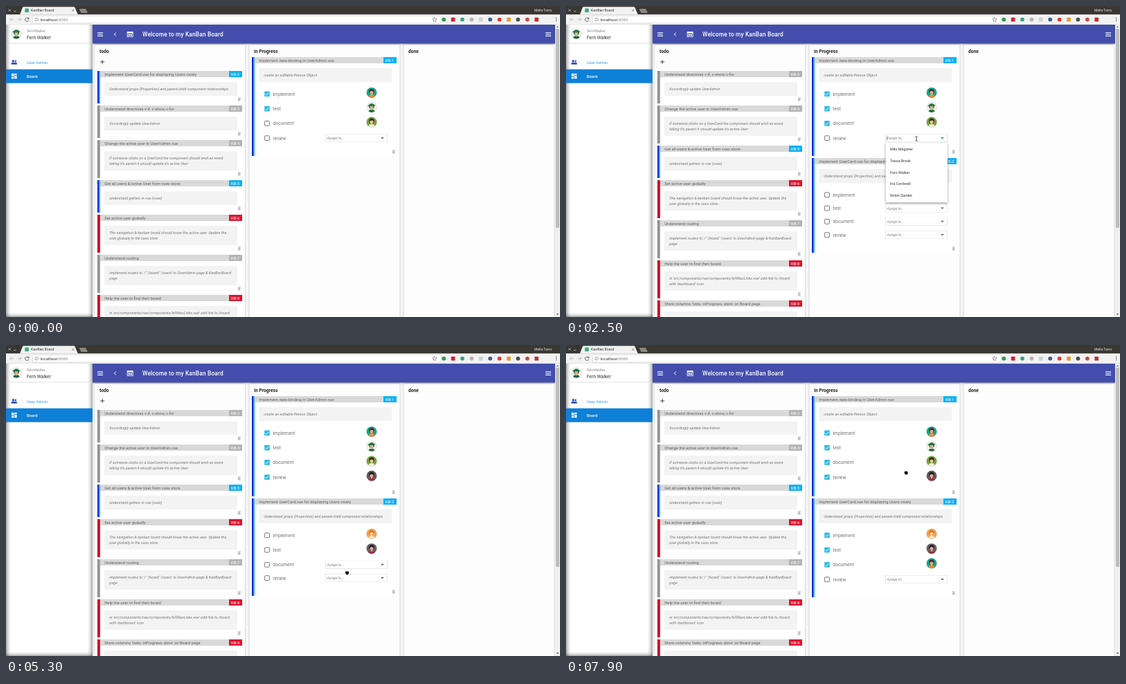
These frames come from a looping animation (800 by 450 pixels, 8000 ms). An HTML page:

```html
<!DOCTYPE html>
<html lang="en">
<head>
<meta charset="utf-8">
<title>KanBan Board</title>
<style>
  html, body { margin: 0; width: 100%; height: 100%; overflow: hidden; background: #fff; }
  svg { display: block; width: 100vw; height: 100vh; }
  text { font-family: Roboto, "Open Sans", sans-serif; white-space: pre; }
  .i { font-style: italic; }
  .m { font-weight: 500; }
  .b { font-weight: 700; }
  .end { text-anchor: end; }
  .wide { letter-spacing: .17px; }
  .card { filter: drop-shadow(0 .6px .7px rgba(0,0,0,.45)); }
  .field { filter: drop-shadow(0 .7px .5px rgba(0,0,0,.4)); }
  .menu { filter: drop-shadow(0 1px 1.6px rgba(0,0,0,.45)); }
  .panel { filter: drop-shadow(.6px 0 1.4px rgba(0,0,0,.28)); }
  .bar { filter: drop-shadow(0 1px 1.2px rgba(0,0,0,.35)); }
</style>
</head>
<body>
<svg viewBox="0 0 800 450" preserveAspectRatio="none">
  <defs>
    <clipPath id="round"><circle r="7.4"/></clipPath>
    <linearGradient id="edge">
      <stop offset="0" stop-color="#000" stop-opacity=".36"/>
      <stop offset=".45" stop-color="#000" stop-opacity=".13"/>
      <stop offset="1" stop-color="#000" stop-opacity="0"/>
    </linearGradient>
  </defs>
  <g id="page"></g>
  <g id="live"></g>
  <g id="chrome"></g>
</svg>
<script>
const LOOP = 8000, STEP = 100, NEVER = 1e9;
const $ = id => document.getElementById(id);

// Drawing helpers; text is placed by its vertical middle.
const text = (x, y, s, size, fill, cls = '') =>
  `<text x="${x}" y="${(y + size * .35).toFixed(2)}" font-size="${size}" fill="${fill}" class="${cls}">${s}</text>`;
const rect = (x, y, w, h, fill, more = '') =>
  `<rect x="${x}" y="${y}" width="${w}" height="${h}" fill="${fill}" ${more}/>`;
const dot = (x, y, r, fill, more = '') => `<circle cx="${x}" cy="${y}" r="${r}" fill="${fill}" ${more}/>`;
const path = (d, fill, more = '') => `<path d="${d}" fill="${fill}" ${more}/>`;
const line = (d, color, w = 1) => path(d, 'none', `stroke="${color}" stroke-width="${w}"`);
const at = (x, y, s) => `<g transform="translate(${x} ${y})">${s}</g>`;

const TONES = {
  blue: { badge: '#12b0f2', left: '#0a28e6', right: '#1fb4fb' },
  gray: { badge: '#b4b4b4', left: '#8c8c8c', right: '#a2a2a2' },
  red: { badge: '#dc1530', left: '#c50f28', right: '#d3182f' }
};

const TODO = [
  { id: 3, tone: 'gray', title: 'Understand directives v-if, v-show, v-for', lines: ['Accordingly update UserAdmin'] },
  { id: 4, tone: 'gray', title: 'Change the active user in UserAdmin.vue',
    lines: ['if someone clicks on a UserCard the component should emit an event', "telling it's parent it should update it's active User"] },
  { id: 5, tone: 'blue', title: 'Get all users &amp; active User from vuex store', lines: ['understand getters in vue (vuex)'] },
  { id: 6, tone: 'red', title: 'Set active user globally',
    lines: ['The navigation &amp; kanban board should know the active user. Update the', 'user globally in the vuex store'] },
  { id: 7, tone: 'gray', title: 'Understand routing',
    lines: ["implement routes to '/' '/board' '/users' to UserAdmin page &amp; KanBanBoard", 'page'] },
  { id: 8, tone: 'red', title: 'Help the user to find their board',
    lines: ["in 'src/components/nav/components/leftNavLinks.vue' add link to /board", "with 'dashboard' icon"] },
  { id: 9, tone: 'red', title: "Show columns 'todo, inProgress, done' on Board page", lines: [''] }
];

// Each step: owner, when its menu opens, when the owner is set, when it is ticked.
const step = (name, who, open, set, tick) => ({ name, who, open, set, tick });
const FIRST = {
  id: 1, tone: 'blue', title: 'Implement data-binding in UserAdmin.vue', lines: ['create an editable Person Object'],
  steps: [
    step('implement', 'teal', NEVER, 0, 0),
    step('test', 'hunter', NEVER, 0, 0),
    step('document', 'green', NEVER, 0, 1700),
    step('review', 'grey', 2300, 2900, 3400)
  ]
};
const MOVED = {
  id: 2, tone: 'blue', title: 'Implement UserCard.vue for displaying Users nicely',
  lines: ['Understand props (Properties) and parent-child component relationships'],
  steps: [
    step('implement', 'orange', 3900, 4300, 5900),
    step('test', 'grey', 4800, 5100, 6500),
    step('document', 'teal', 5400, 5700, 7000),
    step('review', '', NEVER, NEVER, NEVER)
  ]
};
const PEOPLE = ['Milo Magister', 'Tessa Brook', 'Fern Walker', 'Ina Cordwell', 'Robin Sander'];
const GRAB = 200, CROSS = 600, DROP = 1300;

// background, hair, skin, clothes
const FACES = {
  teal: ['#18a98c', '#33343a', '#e9a877', '#f08a3c'],
  hunter: ['#f3f6f0', '#1b4a2c', '#d9b48c', '#1f6b3c'],
  green: ['#77a83c', '#3a2b25', '#f0c39a', '#eef0ea'],
  grey: ['#67606a', '#241f22', '#e3a98d', '#a92c3b'],
  orange: ['#f6a548', '#d9762b', '#f8d0a2', '#f3ead8']
};

function avatar(x, y, who) {
  const [back, hair, skin, shirt] = FACES[who];
  const hat = who === 'hunter' ? path('M-6 -2.2Q0 -8 5.8 -2.6Q0 -1 -6 -2.2Z', '#1d7d42') : '';
  return at(x, y, dot(0, 0, 7.4, back) +
    `<g clip-path="url(#round)">${dot(0, 8, 5.2, shirt)}${dot(0, -1.5, 3.9, hair)}` +
    `${rect(-1.1, 1, 2.2, 3, skin)}${dot(0, -.3, 2.6, skin)}` +
    `${path('M-2.8 -1Q0 -4 2.8 -1L2.6 -2.8Q0 -5 -2.6 -2.8Z', hair)}${hat}</g>` +
    dot(0, 0, 7.2, 'none', 'stroke="#0003" stroke-width=".5"'));
}

const arrow = (x, y, fill) => path(`M${x - 2.4} ${y - 1.2}h4.8l-2.4 2.5z`, fill);

function field(y, active) {
  return rect(461.5, y - 6, 89, 11.6, '#fff', 'class="field"') +
    text(463.5, y + .3, 'Assign to...', 5.1, '#7d7d7d', 'i') +
    arrow(543.5, y, active ? '#13a89a' : '#666') +
    (active ? rect(463, y - 3, .5, 6, '#333') : '');
}

function checkbox(y, on, halo) {
  const glow = halo > 0 ? dot(377, y, 3 + 4.5 * halo, '#29bdf0', 'opacity=".2"') : '';
  return glow + (on
    ? rect(373.2, y - 3.8, 7.6, 7.6, '#2cbbe9', 'rx=".8"') + line(`M374.7 ${y + .1}l1.6 1.7l3.1 -3.4`, '#fff', 1)
    : rect(373.6, y - 3.4, 6.8, 6.8, '#fff', 'rx=".7" stroke="#6a6a6a" stroke-width=".9"'));
}

function menu(y) {
  return rect(461.5, y + 7, 89.5, 86, '#fff', 'class="menu"') +
    PEOPLE.map((name, i) => text(468, y + 16.3 + 16.6 * i, name, 5.42, '#333')).join('');
}

const trash = (x, y) => rect(x - 1.8, y - 1.8, 3.6, 4.4, '#c2c2c2', 'rx=".5"') + rect(x - 2.2, y - 2.9, 4.4, .7, '#c2c2c2');

function card(x, y, c, height) {
  const tone = TONES[c.tone];
  return rect(x, y, 209, height, '#fff', 'class="card"') +
    rect(x + 4, y, 205, 9, '#d9d9d9') +
    rect(x, y, 2, height, tone.left) + rect(x + 2, y, 2, height, tone.right) +
    text(x + 10.2, y + 4.7, c.title, 5.83, '#5c5c5c') +
    rect(x + 190, y, 19, 9, tone.badge) +
    text(x + 193, y + 4.7, 'KB-' + c.id, 5.83, '#fff') +
    rect(x + 10, y + 16, 192, 12 + 8 * c.lines.length, '#f3f3f3') +
    c.lines.map((s, i) => text(x + 17.2, y + 26.2 + 8 * i, s, 5.5, '#757575', 'i')).join('') +
    trash(x + 204.7, y + height - 6);
}

const GAP = 3;
const plainHeight = c => 39 + 8 * c.lines.length;

function todoColumn(cards) {
  let y = 94, out = '';
  for (const c of cards) {
    out += card(132, y, c, plainHeight(c));
    y += plainHeight(c) + GAP;
  }
  return out;
}

// Lays out a card with its steps; rows with an owner are a little taller.
function stepCard(y, c, t) {
  let rowY = y + 53.3, rows = '', popup = '';
  const fields = [];
  for (const s of c.steps) {
    const owned = t >= s.set, open = t >= s.open && !owned;
    const since = t - s.tick;
    const halo = since >= 0 && s.tick > 0 && since < 450 ? Math.min(1, (since + 100) / 300) : 0;
    rows += checkbox(rowY, since >= 0, halo) + text(385.5, rowY + .2, s.name, 6.67, '#757575');
    if (owned) rows += avatar(528, rowY - 2, s.who);
    else { rows += field(rowY, open); fields.push(rowY); }
    if (open) popup = menu(rowY);
    rowY += owned ? 21.3 : 19.3;
  }
  const height = Math.round(rowY - y + 6.5);
  return { svg: card(355, y, c, height) + rows, bottom: y + height, popup, fields };
}

// Pointer path: time, x, y
const TRACK = [
  [100, 231, 112], [200, 231, 112], [900, 456, 252], [1000, 465, 259], [1200, 465, 262], [1300, 465, 262],
  [1600, 378, 171], [1900, 378, 171], [2300, 506, 192], [2500, 506, 192], [2800, 490, 257], [2900, 490, 257],
  [3300, 378, 191], [3400, 378, 191], [3700, 518, 299], [3900, 503, 276], [4000, 500, 278], [4200, 488, 324],
  [4300, 488, 324], [4700, 474, 297], [4800, 474, 297], [5000, 488, 363], [5100, 488, 363], [5400, 494, 318],
  [5600, 488, 351], [5700, 488, 351], [5900, 378, 276], [6100, 378, 276], [6300, 391, 291], [6500, 378, 297],
  [6700, 378, 297], [7000, 378, 318], [7300, 378, 318], [7900, 491, 185]
];

function pointer(t) {
  const i = TRACK.findIndex(p => p[0] > t);
  if (i < 0) return TRACK[TRACK.length - 1].slice(1);
  if (i === 0) return null;
  const [t0, x0, y0] = TRACK[i - 1], [t1, x1, y1] = TRACK[i];
  const u = (t - t0) / (t1 - t0), k = u * u * (3 - 2 * u);
  return [x0 + (x1 - x0) * k, y0 + (y1 - y0) * k];
}

const OUTLINE = 'stroke="#fff" stroke-width=".5"';
const FIST = path('M-2.8 -.8Q-2.6 -2.8 -.8 -2.4Q.8 -3.2 2 -2Q3.4 -1.6 3 .6Q2.6 3 .2 3Q-2.2 2.8 -2.8 -.8Z', '#111', OUTLINE);
const CURSORS = {
  beam: line('M-1.5 -3.2Q0 -3.2 0 -2.2Q0 -3.2 1.5 -3.2M0 -2.4V2.4M-1.5 3.2Q0 3.2 0 2.2Q0 3.2 1.5 3.2', '#222', .8),
  fist: FIST,
  drag: FIST + dot(3.2, 3.6, 1.6, '#333', OUTLINE),
  hand: path('M-1 -2Q0 -3 .7 -1.6L1 .2Q3.8 .2 4 1.8Q4 4.4 2.6 5.6H-.2Q-2 3.8 -2.6 2.2Q-1.6 1.4 -.6 2.2Z', '#111', OUTLINE)
};

const dragging = t => t >= GRAB && t < DROP;

function cursor([x, y], t, fields, open) {
  const inField = x > 461 && x < 551 && fields.some(f => Math.abs(f - y) < 6.5);
  const kind = dragging(t) ? 'drag' : inField ? 'beam' : open || x < 420 ? 'hand' : 'fist';
  return at(x.toFixed(1), y.toFixed(1), CURSORS[kind]);
}

function draw(t) {
  const spot = pointer(t);
  const first = stepCard(74, FIRST, t);
  const top = first.bottom + GAP;
  let out = todoColumn(t < CROSS ? [MOVED, ...TODO] : TODO) + first.svg;
  let popup = first.popup, fields = first.fields;
  if (t >= DROP) {
    const second = stepCard(top, MOVED, t);
    out += second.svg;
    popup += second.popup;
    fields = fields.concat(second.fields);
  } else if (t >= CROSS) {
    out += card(355, top, MOVED, plainHeight(MOVED));
  }
  out += popup;
  if (dragging(t)) {
    const ghost = card(Math.round(spot[0] - 100), Math.round(spot[1] - 18), MOVED, plainHeight(MOVED));
    out += `<g opacity=".7">${ghost}</g>`;
  }
  if (spot) out += cursor(spot, t, fields, popup);
  $('live').innerHTML = out;
}

const burger = x => [38.2, 40.6, 43].map(y => rect(x - 4, y, 8, 1, '#fff')).join('');

function sidebar() {
  const person = (x, s) => dot(x, 79.7, 1.6 * s, '#2b44c0') +
    path(`M${x - 2.8 * s} 84.5q0 -3 ${2.8 * s} -3t${2.8 * s} 3z`, '#2b44c0');
  return rect(0, 27, 125, 423, '#fff') +
    rect(0, 27, 7, 423, 'url(#edge)') +
    rect(0, 0, 7, 423, 'url(#edge)', 'transform="translate(125 27) scale(-1 1)"') +
    rect(0, 0, 6, 125, 'url(#edge)', 'transform="translate(0 450) rotate(-90)"') +
    rect(0, 53.5, 125, .7, '#d4d4d4') +
    avatar(15, 40, 'hunter') +
    text(30, 36.3, 'fernWalker', 5.83, '#8a8a8a', 'i') + text(30, 45.2, 'Fern Walker', 6.67, '#333') +
    person(13.8, .8) + person(10.2, 1) + text(30, 81.6, 'User Admin', 5.83, '#2a97ec') +
    rect(0, 91.6, 125, 20, '#0f80d7') +
    rect(8, 97.8, 3.4, 4.2, '#fff') + rect(8, 102.8, 3.4, 2.4, '#fff') +
    rect(12.2, 97.8, 3.4, 2.4, '#fff') + rect(12.2, 101, 3.4, 4.2, '#fff') +
    text(30, 101.6, 'Board', 5.83, '#fff', 'm');
}

function page() {
  const columns = [[128, 'todo', 135], [351.5, 'In Progress', 358], [574.5, 'done', 581]];
  return rect(0, 0, 800, 450, '#fafafa') +
    columns.map(([x, name, tx]) => rect(x, 56, 217, 400, '#fdfdfd', 'class="panel"') + text(tx, 65.4, name, 6.67, '#222', 'b')).join('') +
    rect(136.2, 80.4, 5.8, .9, '#333') + rect(138.65, 77.9, .9, 5.8, '#333') +
    rect(125, 27, 668, 27.4, '#434eac', 'class="bar"') +
    burger(136) + line('M158.8 38.4l-2.4 2.5l2.4 2.5', '#fff', 1) +
    rect(175.2, 37.6, 8, 6.8, 'none', 'stroke="#fff" stroke-width=".9"') + rect(175.2, 37.4, 8, 2, '#fff') +
    rect(176.6, 40.6, 2.2, 2.4, '#fff') + rect(179.6, 40.6, 2.2, 2.4, '#fff') +
    text(197, 41, 'Welcome to my KanBan Board', 8.33, '#fff', 'm wide') + burger(783) +
    sidebar() +
    rect(793, 27, 7, 423, '#f1f1f1') + rect(794, 33, 5, 288, '#bdbdbd') +
    path('M794.8 31l1.7 -2l1.7 2z', '#777') + path('M794.8 445l1.7 2l1.7 -2z', '#555');
}

function chrome() {
  const extras = ['#2c9a45', '#d3202e', '#35a57c', '#b5b5b5', '#cfcfcf', '#3b5f94', '#dd3a30', '#e59a2c', '#4b4b4b', '#c94a3f', '#b8322c'];
  return rect(0, 0, 800, 12.5, '#393732') +
    line('M3.6 4.6l3.2 3.2m0 -3.2l-3.2 3.2M11 7.6h3.4', '#dcdcdc', .7) +
    path('M20 12.5L24 2Q24.4 1.2 25.4 1.2H98Q99 1.2 99.4 2L104 12.5Z', '#f2f2f2') +
    rect(27.3, 3.6, 5.6, 5.6, '#3aa87c') + text(36, 6.4, 'KanBan Board', 5.3, '#333') +
    line('M95.2 4.9l3 3m0 -3l-3 3', '#666', .7) +
    path('M105.5 4h9.5l3 6h-9.5z', '#8b8882') +
    text(788, 6.2, 'Melia Tarro', 5, '#e8e8e8', 'end') +
    rect(0, 12.5, 800, 14.5, '#f2f2f2') + rect(0, 26.5, 800, .5, '#d2d2d2') +
    line('M11 19.6H5.4M8 17l-2.6 2.6l2.6 2.6', '#bbb', .9) +
    line('M16.5 19.6h5.6M19.5 17l2.6 2.6l-2.6 2.6', '#bbb', .9) +
    line('M32.6 18.2A2.7 2.7 0 1 0 33 20.4M33 16.6v2h-2', '#555', .9) +
    rect(38.5, 14.4, 589.5, 10.4, '#fff', 'rx="1" stroke="#ccc" stroke-width=".5"') +
    dot(44, 19.6, 2.3, 'none', 'stroke="#777" stroke-width=".6"') + rect(43.7, 19.2, .6, 1.8, '#777') + rect(43.7, 18.1, .6, .6, '#777') +
    text(49.5, 19.6, 'localhost<tspan fill="#8a8a8a">:8080</tspan>', 6.1, '#333') +
    path('M619 16.4l.9 2.1l2.3 .2l-1.7 1.5l.5 2.3l-2 -1.2l-2 1.2l.5 -2.3l-1.7 -1.5l2.3 -.2z', 'none', 'stroke="#666" stroke-width=".6"') +
    extras.map((c, i) => i % 3 === 1 ? rect(629.4 + 13.4 * i, 16.8, 5.6, 5.6, c, 'rx=".5"') : dot(632.2 + 13.4 * i, 19.6, 2.9, c)).join('') +
    [17.2, 19.5, 21.8].map(y => dot(794.5, y, .7, '#555')).join('');
}

$('page').innerHTML = page();
$('chrome').innerHTML = chrome();

let shown = -1;
const start = performance.now();
function tick() {
  const t = Math.floor(((performance.now() - start) % LOOP) / STEP) * STEP;
  if (t !== shown) draw(shown = t);
  requestAnimationFrame(tick);
}
tick();
</script>
</body>
</html>
```
